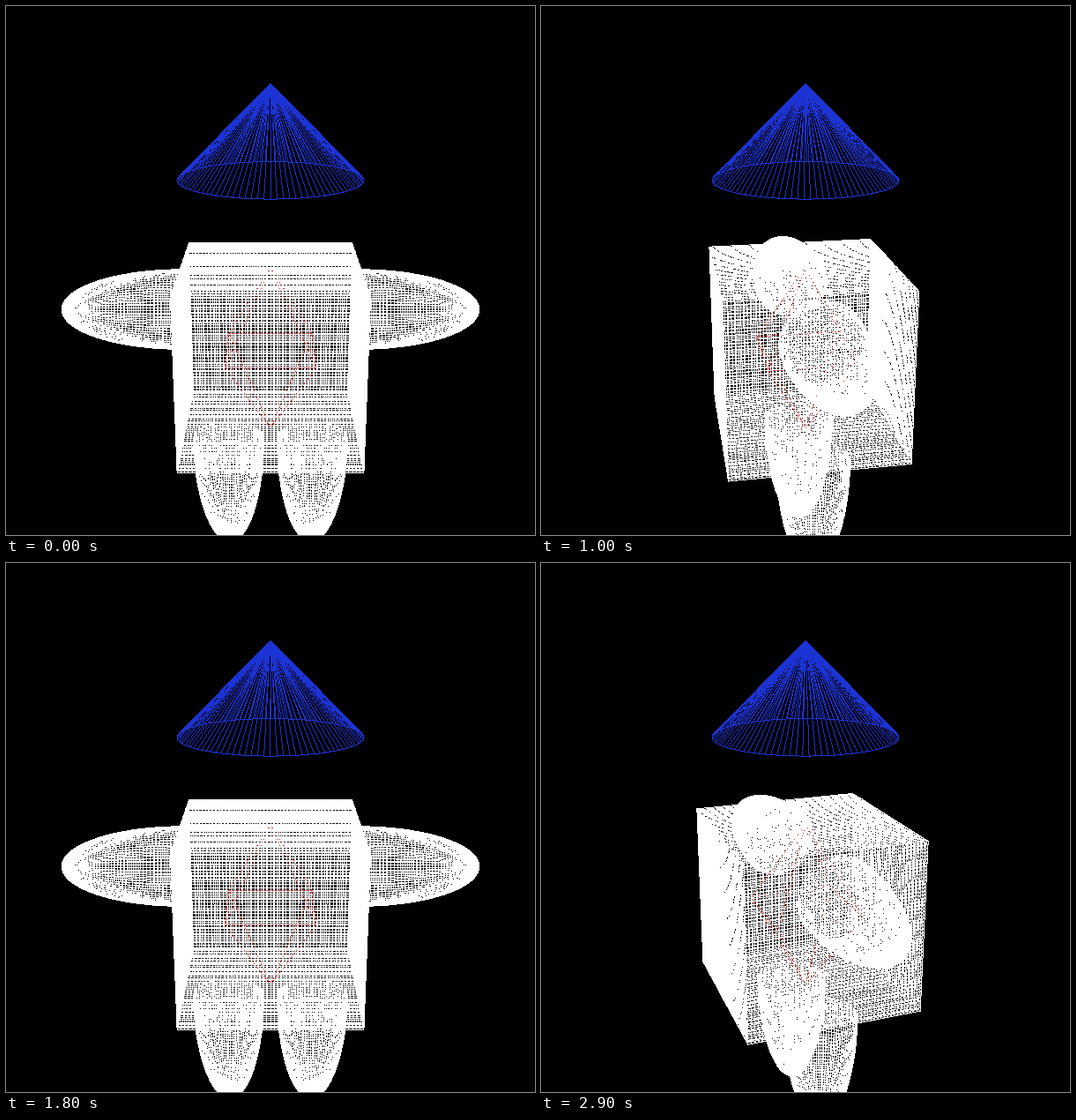
Animation, 600 px wide and 600 px high, one loop 3 s. Source, as an HTML page with a canvas:

```html
<!DOCTYPE html>
<html lang="en">
<head>
<meta charset="utf-8">
<title>Turning wireframe figure</title>
<style>
  html, body { margin: 0; width: 100%; height: 100%; overflow: hidden; background: #000; }
  canvas { display: block; width: 600px; height: 600px; }
</style>
</head>
<body>
<canvas id="stage" width="600" height="600"></canvas>
<script>
const SIZE = 600, STEP_MS = 100, STEPS = 30, TURN = Math.PI / 18;
const FOCAL = 951.5, DIST = 9.343, LIFT = 0.04;
const TILT_SIN = 0.304, TILT_COS = Math.sqrt(1 - TILT_SIN * TILT_SIN);

const ctx = document.getElementById('stage').getContext('2d');
const image = ctx.createImageData(SIZE, SIZE);
const pixels = new Uint32Array(image.data.buffer);
const depth = new Float32Array(SIZE * SIZE);

const rgb = (r, g, b) => (255 << 24 | b << 16 | g << 8 | r) >>> 0;
const BLACK = rgb(0, 0, 0), WHITE = rgb(255, 255, 255);
const BLUE = rgb(28, 51, 212), RED = rgb(192, 48, 48);

// Each path is a color and a polyline of [x, y, z] points.
const paths = [];
const add = (color, points) => paths.push({ color, points });
const sweep = (n, fn) => Array.from({ length: n + 1 }, (_, i) => fn(i / n));

function cone(slices) {
  const rim = t => [Math.sin(t * 2 * Math.PI), 1, Math.cos(t * 2 * Math.PI)];
  add(BLUE, sweep(slices, rim));
  for (let i = 0; i < slices; i++) add(BLUE, [[0, 2, 0], rim(i / slices)]);
}

function box(cells) {
  for (let i = 0; i <= cells; i++) {
    const u = 2 * i / cells - 1;
    for (const s of [-1, 1]) {
      const faces = [v => [u, v, s], v => [v, u, s], v => [s, u, v],
                     v => [s, v, u], v => [u, s, v], v => [v, s, u]];
      for (const at of faces) {
        add(WHITE, [-1, 1].map(v => { const [x, y, z] = at(v); return [x, y - 1, z]; }));
      }
    }
  }
}

// Half ellipsoid: place(along, p, q) maps it into the scene.
function shell(radius, length, rings, slices, place) {
  const at = (a, b) => {
    const r = radius * Math.cos(a * Math.PI / 2), w = b * 2 * Math.PI;
    return place(length * Math.sin(a * Math.PI / 2), r * Math.cos(w), r * Math.sin(w));
  };
  for (let i = 0; i < rings; i++) add(WHITE, sweep(slices, b => at(i / rings, b)));
  for (let j = 0; j < slices; j++) add(WHITE, sweep(rings, a => at(a, j / slices)));
}

function diamond(half) {
  const ring = [[-half, -1, half], [half, -1, half], [half, -1, -half], [-half, -1, -half]];
  add(RED, [...ring, ring[0]]);
  for (const p of ring) add(RED, [[0, 0, 0], p, [0, -2, 0]]);
}

cone(100);
box(50);
for (const side of [-1, 1]) {
  shell(0.45, 1.355, 50, 80, (l, p, q) => [side * (1 + l), p - 0.5, q]);
  shell(0.42, 1.4, 50, 80, (l, p, q) => [side * 0.5 + p, -2.14 - l, q]);
}
diamond(0.5);

function project([x, y, z], sin, cos) {
  const rx = x * cos + z * sin, rz = z * cos - x * sin, ry = y + LIFT;
  const near = 1 / (DIST - ry * TILT_SIN - rz * TILT_COS);
  return [
    SIZE / 2 + FOCAL * rx * near,
    SIZE / 2 - FOCAL * (ry * TILT_COS - rz * TILT_SIN) * near,
    near
  ];
}

// Hard one-pixel line with a depth test.
function line(a, b, color) {
  const n = Math.max(1, Math.ceil(Math.max(Math.abs(b[0] - a[0]), Math.abs(b[1] - a[1]))));
  const dx = (b[0] - a[0]) / n, dy = (b[1] - a[1]) / n, dw = (b[2] - a[2]) / n;
  for (let i = 0; i <= n; i++) {
    const x = Math.floor(a[0] + dx * i), y = Math.floor(a[1] + dy * i), w = a[2] + dw * i;
    if (x < 0 || y < 0 || x >= SIZE || y >= SIZE) continue;
    const k = y * SIZE + x;
    if (w > depth[k]) {
      depth[k] = w;
      pixels[k] = color;
    }
  }
}

function draw(step) {
  pixels.fill(BLACK);
  depth.fill(0);
  const sin = Math.sin(step * TURN), cos = Math.cos(step * TURN);
  for (const { color, points } of paths) {
    let last = project(points[0], sin, cos);
    for (let i = 1; i < points.length; i++) {
      const next = project(points[i], sin, cos);
      line(last, next, color);
      last = next;
    }
  }
  ctx.putImageData(image, 0, 0);
}

let shown = -1;
function tick() {
  const step = Math.floor(performance.now() / STEP_MS) % STEPS;
  if (step !== shown) draw(shown = step);
  requestAnimationFrame(tick);
}
tick();
</script>
</body>
</html>
```
